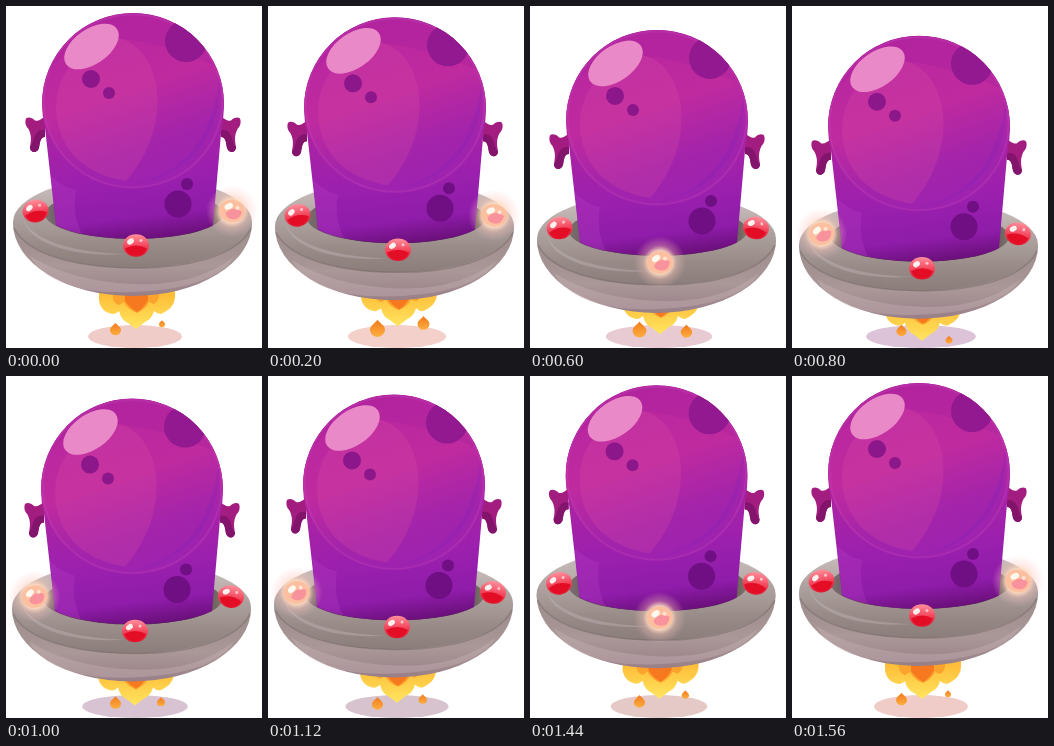
Animation, 256 px wide and 342 px high, one loop 1600 ms. Source, as an HTML page:

```html
<!DOCTYPE html>
<html lang="en">
<head>
<meta charset="utf-8">
<title>Flying saucer</title>
<style>
html, body { margin: 0; width: 100%; height: 100%; overflow: hidden; background: #fff; }
svg { display: block; width: 100%; height: 100%; }
</style>
</head>
<body>
<svg viewBox="0 0 256 342" xmlns="http://www.w3.org/2000/svg">
  <defs>
    <linearGradient id="skin" x1=".45" y1="0" x2=".55" y2="1">
      <stop offset="0" stop-color="#a8209c"/>
      <stop offset=".4" stop-color="#b0249f"/>
      <stop offset=".72" stop-color="#9c20ae"/>
      <stop offset=".9" stop-color="#8f1caa"/>
      <stop offset="1" stop-color="#6c107c"/>
    </linearGradient>
    <linearGradient id="head" x1=".3" y1="0" x2=".65" y2="1">
      <stop offset="0" stop-color="#b8259f"/>
      <stop offset=".45" stop-color="#bf2a9f"/>
      <stop offset=".75" stop-color="#a424aa"/>
      <stop offset="1" stop-color="#9c22b0"/>
    </linearGradient>
    <linearGradient id="ring" x1="0" y1="0" x2="0" y2="1">
      <stop offset="0" stop-color="#d0c6c4"/>
      <stop offset=".4" stop-color="#b0a4a2"/>
      <stop offset=".75" stop-color="#988b87"/>
      <stop offset="1" stop-color="#8a7d7a"/>
    </linearGradient>
    <linearGradient id="bowl" x1="0" y1="0" x2="0" y2="1">
      <stop offset="0" stop-color="#9c8c8c"/>
      <stop offset=".6" stop-color="#aa9797"/>
      <stop offset="1" stop-color="#987f88"/>
    </linearGradient>
    <linearGradient id="pit">
      <stop offset="0" stop-color="#7d7070"/>
      <stop offset=".25" stop-color="#4a3445"/>
      <stop offset=".85" stop-color="#463845"/>
      <stop offset="1" stop-color="#80776c"/>
    </linearGradient>
    <linearGradient id="fire" x1="0" y1="0" x2="0" y2="1">
      <stop offset=".5" stop-color="#ffbd38"/>
      <stop offset="1" stop-color="#ffe560"/>
    </linearGradient>
    <linearGradient id="ember" x1="0" y1="0" x2="0" y2="1">
      <stop offset="0" stop-color="#f27a1c"/>
      <stop offset="1" stop-color="#fcae40"/>
    </linearGradient>
    <linearGradient id="red" x1="0" y1="0" x2="0" y2="1">
      <stop offset="0" stop-color="#ff909c"/>
      <stop offset=".5" stop-color="#f34a60"/>
      <stop offset="1" stop-color="#e0142c"/>
    </linearGradient>
    <radialGradient id="halo">
      <stop offset=".45" stop-color="#ffe0c4" stop-opacity=".9"/>
      <stop offset=".65" stop-color="#ffc9bc" stop-opacity=".35"/>
      <stop offset="1" stop-color="#ffc0cc" stop-opacity="0"/>
    </radialGradient>
    <clipPath id="inside"><path d="M36 98A91 91 0 0 1 218 98V190H36Z"/></clipPath>
    <g id="ear">
      <path d="M19.5 114C20 110 26 111 29 114.5Q33 116 39 110V131C34 131 34 137 33 142C31 148 24 147 24 141C25 135 26 130 22.5 123C20 120 19 118 19.5 114Z" fill="#a31d80"/>
      <path d="M39 124V131C34 131 34 137 33 142C31 148 24 147 24 141C29 137 26 123 39 124Z" fill="#82146c"/>
    </g>
    <g id="lamp">
      <ellipse rx="13" ry="11.3" fill="url(#red)"/>
      <path d="M-11 3Q0-3 11 3Q8 10 0 10T-11 3Z" fill="#e30e26"/>
      <ellipse cx="-5.5" cy="-4" rx="3.7" ry="2.6" transform="rotate(-35 -5.5 -4)" fill="#fff0f0"/>
      <circle cx="5" cy="-5" r="1.5" fill="#ffc3cb"/>
    </g>
    <g id="lit">
      <circle r="26" fill="url(#halo)"/>
      <ellipse rx="13" ry="11.3" fill="#fcbfa0"/>
      <path d="M-6 3Q0-6 10-1Q9 8 2 8T-6 3Z" fill="#f8929c"/>
      <ellipse cx="-4" cy="-4" rx="4.5" ry="3" transform="rotate(-35 -4 -4)" fill="#fff8ee"/>
      <circle cx="5" cy="-4" r="2" fill="#ffe2d4"/>
    </g>
    <path id="drop" d="M0-1.25C.3-.8 1-.5 1 .1A1 .95 0 0 1-1 .1C-1-.5-.3-.8 0-1.25Z"/>
  </defs>

  <ellipse id="shadow" cx="129" cy="330.5" ry="11.5"/>

  <g id="ship">
    <g id="flame">
      <path d="M93 255V294C94 303 101 308 108 308Q111 307 113 305Q115 314 122 317L130 323L139 316Q146 313 148 305Q151 308 155 308C162 305 169 300 169 290V255Z" fill="url(#fire)"/>
      <path d="M107 255V293Q109 298 113 299L118 296Q121 303 131 307Q140 303 143 296L148 298Q153 295 153 289V255Z" fill="#fba32d"/>
      <path d="M119 255V295Q124 302 131 306Q138 302 142 294V255Z" fill="#f6781f"/>
    </g>

    <use href="#ear"/>
    <use href="#ear" transform="matrix(-1 0 0 1 254 0)"/>

    <path d="M7 217A119.5 73 0 0 0 246 217Z" fill="url(#bowl)"/>
    <path d="M24 250Q64 275 127 278T229 250Q208 283 127 286T24 250Z" fill="#c5b2b4" opacity=".4"/>
    <ellipse cx="126.5" cy="216" rx="119.5" ry="46" fill="url(#ring)"/>
    <path d="M8 222C22 250 72 261 126 262S232 250 245 222" fill="none" stroke="#766868" stroke-width="1.5" opacity=".5"/>
    <path d="M17 212C24 234 68 247 120 248C72 252 22 239 17 212Z" fill="#c8bec2" opacity=".35"/>
    <ellipse cx="128" cy="208" rx="89" ry="25" fill="url(#pit)"/>

    <path d="M36 98A91 91 0 0 1 218 98Q218 110 215.5 122L207 219.5A89 25 0 0 1 50 219.5L39 122Q36 110 36 98Z" fill="url(#skin)"/>
    <path d="M45 170Q58 182 70 184Q66 208 76 228Q58 224 50 218Z" fill="#bd45c4" opacity=".25"/>
    <g clip-path="url(#inside)">
      <ellipse cx="127" cy="94" rx="91" ry="87" fill="url(#head)"/>
      <path d="M36 98C40 24 110 14 218 64V0H36Z" fill="#9b1c9b" opacity=".25"/>
      <path d="M112 32C154 40 171 116 120 175C75 168 50 140 50 100C50 64 80 36 112 32Z" fill="#dc4ba2" opacity=".25"/>
      <path d="M214 70C217 130 182 170 125 180C185 166 207 126 214 70Z" fill="#7e20b8" opacity=".25"/>
      <ellipse cx="127" cy="95" rx="89.5" ry="86.5" fill="none" stroke="#c444b4" stroke-width="2" opacity=".35"/>
      <circle cx="180" cy="35" r="21" fill="#92198f"/>
    </g>
    <ellipse cx="85.5" cy="40.5" rx="31" ry="17.5" transform="rotate(-35 85.5 40.5)" fill="#ea89c8"/>
    <g fill="#8b178a">
      <circle cx="85" cy="73" r="9"/>
      <circle cx="103" cy="87" r="6"/>
    </g>
    <g fill="#700f83">
      <circle cx="172" cy="198" r="13.5"/>
      <circle cx="181" cy="178" r="6"/>
    </g>

    <use class="bulb" transform="translate(29.5 205) rotate(-10)"/>
    <use class="bulb" transform="translate(130 239.5)"/>
    <use class="bulb" transform="translate(226 205) rotate(10)"/>
  </g>

  <use id="sparkL" href="#drop" fill="url(#ember)"/>
  <use id="sparkR" href="#drop" fill="url(#ember)"/>
</svg>

<script>
const LOOP = 1600, STEP = 40, CYCLE = LOOP - STEP, HALF = CYCLE / 2;
const TIMES = [0, 200, 440, 800, 1000, 1280, CYCLE];
const el = id => document.getElementById(id);
const bulbs = [...document.querySelectorAll('.bulb')];

// One value per entry of TIMES; the first value closes the loop.
const tracks = {
  x:     [0, 0, 0, 0, -1, -1],
  flame: [0, -7, -12.5, -11, -9, -6],
  r:     [240, 243, 240, 220, 216, 212],
  g:     [204, 208, 207, 195, 195, 196],
  b:     [200, 201, 206, 215, 211, 196],
  ly:    [323.5, 323, 323.5, 325, 327, 329],
  lr:    [5.5, 7.5, 8.5, 5, 5.5, 5.5],
  rx:    [156, 155.5, 156, 157, 155, 154.5],
  ry:    [318, 317.5, 319, 334, 326, 320],
  rr:    [3, 6, 7.5, 3.5, 4, 4.5]
};

function sample(v, t) {
  const n = v.length;
  let i = 0;
  while (i < n - 1 && t >= TIMES[i + 1]) i++;
  const u = (t - TIMES[i]) / (TIMES[i + 1] - TIMES[i]);
  return v[i] + (v[(i + 1) % n] - v[i]) * u;
}

function place(id, x, y, r) {
  el(id).setAttribute('transform', `translate(${x} ${y}) scale(${r})`);
}

function draw(now) {
  const t = Math.floor((now % LOOP) / STEP) * STEP;
  const sink = 1 - Math.abs(t - HALF) / HALF;
  const p = {};
  for (const k in tracks) p[k] = sample(tracks[k], t);

  el('ship').setAttribute('transform', `translate(${p.x} ${23.5 * sink ** 1.25})`);
  el('flame').setAttribute('transform', `translate(0 ${p.flame})`);
  el('shadow').setAttribute('rx', 47 + 8 * sink);
  el('shadow').setAttribute('fill', `rgb(${[p.r, p.g, p.b].map(Math.round)})`);
  place('sparkL', 109.5, p.ly, p.lr);
  place('sparkR', p.rx, p.ry, p.rr);

  // The light runs right, front, left, front.
  const on = [2, 1, 0, 1][Math.floor(t / (CYCLE / 4)) % 4];
  bulbs.forEach((b, i) => b.setAttribute('href', i === on ? '#lit' : '#lamp'));
}

let start;
function tick(now) {
  start ??= now;
  draw(now - start);
  requestAnimationFrame(tick);
}
draw(0);
requestAnimationFrame(tick);
</script>
</body>
</html>
```
